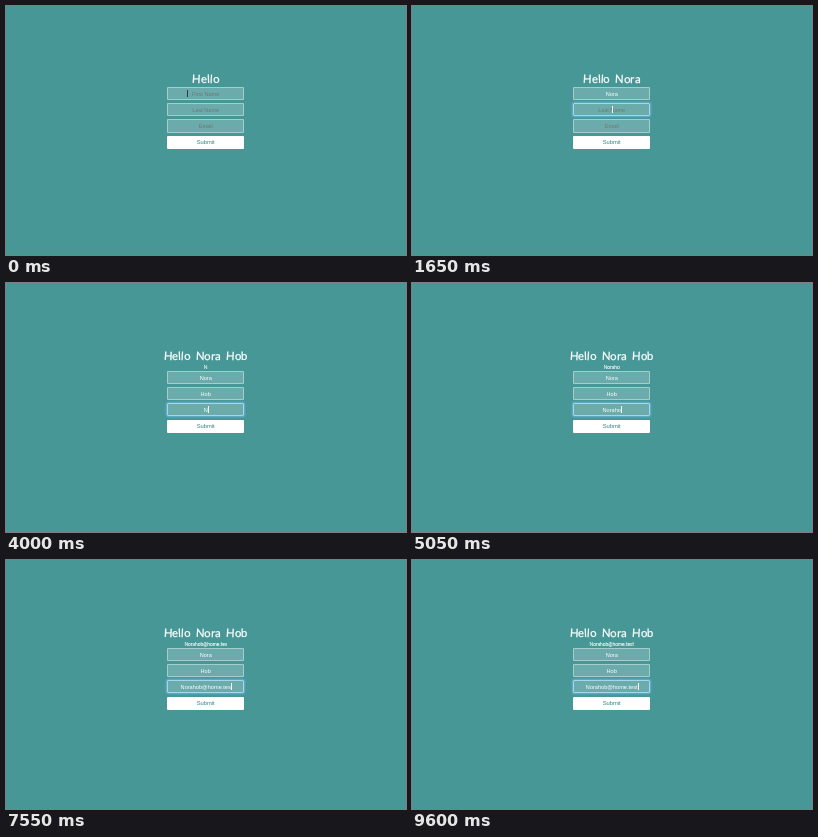
These frames come from a looping animation (400x249 px, 9.65 s). An HTML page:

```html
<!DOCTYPE html>
<html lang="en">
<head>
<meta charset="utf-8">
<title>Hello form</title>
<style>
html, body { margin: 0; width: 100%; height: 100%; overflow: hidden; background: #469796; }
body { position: relative; color: #fff; }
#title, #mail {
  position: absolute; left: 0; width: 399.4px; text-align: center; white-space: pre;
  font-family: Lato, sans-serif;
}
#title { top: 65px; font-size: 11.4px; line-height: 16px; word-spacing: 2.6px; -webkit-text-stroke: .25px #fff; }
#title span { display: inline-block; }
#mail { top: 81px; font-size: 4.9px; line-height: 7px; -webkit-text-stroke: .1px #fff; }
#form { position: absolute; left: 161px; top: 0; width: 77.4px; }
.field, #submit {
  position: absolute; left: 0; box-sizing: border-box; width: 100%; height: 13.2px;
  border-radius: 1px; text-align: center; white-space: pre;
  font: 5.6px/12.2px "Liberation Sans", Arial, sans-serif;
}
.field { border: .5px solid rgba(255, 255, 255, .4); background: rgba(255, 255, 255, .2); }
.field.focus { border-color: #a5d5f0; box-shadow: 0 0 2px 1px rgba(112, 186, 236, .75); }
.empty { color: #6f7776; }
#submit { top: 130px; height: 12.8px; background: #fff; color: #2f8583; font-size: 5.8px; line-height: 12.8px; }
#caret { position: absolute; width: .7px; height: 6.6px; background: #fff; }
#beam { position: absolute; left: 181px; top: 84px; width: 1px; height: 6.5px; background: #263f3f; }
</style>
</head>
<body>
<div id="title"></div>
<div id="mail"></div>
<div id="form">
  <div class="field"></div>
  <div class="field"></div>
  <div class="field"></div>
  <div id="submit">Submit</div>
  <div id="caret"></div>
</div>
<div id="beam"></div>
<script>
const LOOP = 9650, LINE = 6.8, BLINK = 500;
const $ = id => document.getElementById(id);
const boxes = [...document.querySelectorAll('.field')];

// focus: click time, start: first key, step: time between keys
const fields = [
  { hint: 'First Name', text: 'Nora', focus: 150, start: 450, step: 200 },
  { hint: 'Last Name', text: 'Hob', focus: 1450, start: 1950, step: 220 },
  { hint: 'Email', text: 'Norahob@home.test', focus: 3200, start: 3790, step: 237.5 }
];
boxes.forEach((box, i) => box.style.top = 81 + 16.2 * i + 'px');

const pen = document.createElement('canvas').getContext('2d');
pen.font = '5.6px "Liberation Sans", Arial, sans-serif';

function typed(f, t) {
  const n = Math.floor((t - f.start) / f.step) + 1;
  return f.text.slice(0, Math.max(0, n));
}

let shownTitle;
function setTitle(text) {
  if (text === shownTitle) return;
  shownTitle = text;
  // small tilts give the letters a handwritten feel
  $('title').replaceChildren(...[...text].map((c, i) => {
    if (c === ' ') return ' ';
    const s = document.createElement('span');
    s.textContent = c;
    s.style.transform = `rotate(${3 * Math.sin(i * 2.3 + 1)}deg)`;
    return s;
  }));
}

function draw(t) {
  const values = fields.map(f => typed(f, t));
  const active = fields.filter(f => t >= f.focus).length - 1;

  setTitle(['Hello', values[0], values[1]].filter(Boolean).join(' '));
  $('mail').textContent = values[2];
  $('form').style.top = (values[2] ? LINE : 0) + 'px';
  $('beam').hidden = active >= 0;

  boxes.forEach((box, i) => {
    box.textContent = values[i] || fields[i].hint;
    box.classList.toggle('empty', !values[i]);
    box.classList.toggle('focus', i === active);
  });

  const caret = $('caret');
  caret.hidden = active < 0;
  if (active < 0) return;
  const f = fields[active], n = values[active].length;
  const since = t - (n ? f.start + (n - 1) * f.step : f.focus);
  caret.hidden = since % (2 * BLINK) >= BLINK;
  caret.style.left = 38.7 + pen.measureText(values[active]).width / 2 + 'px';
  caret.style.top = 84.2 + 16.2 * active + 'px';
}

const begin = performance.now();
function tick() {
  draw((performance.now() - begin) % LOOP);
  requestAnimationFrame(tick);
}
tick();
</script>
</body>
</html>
```
